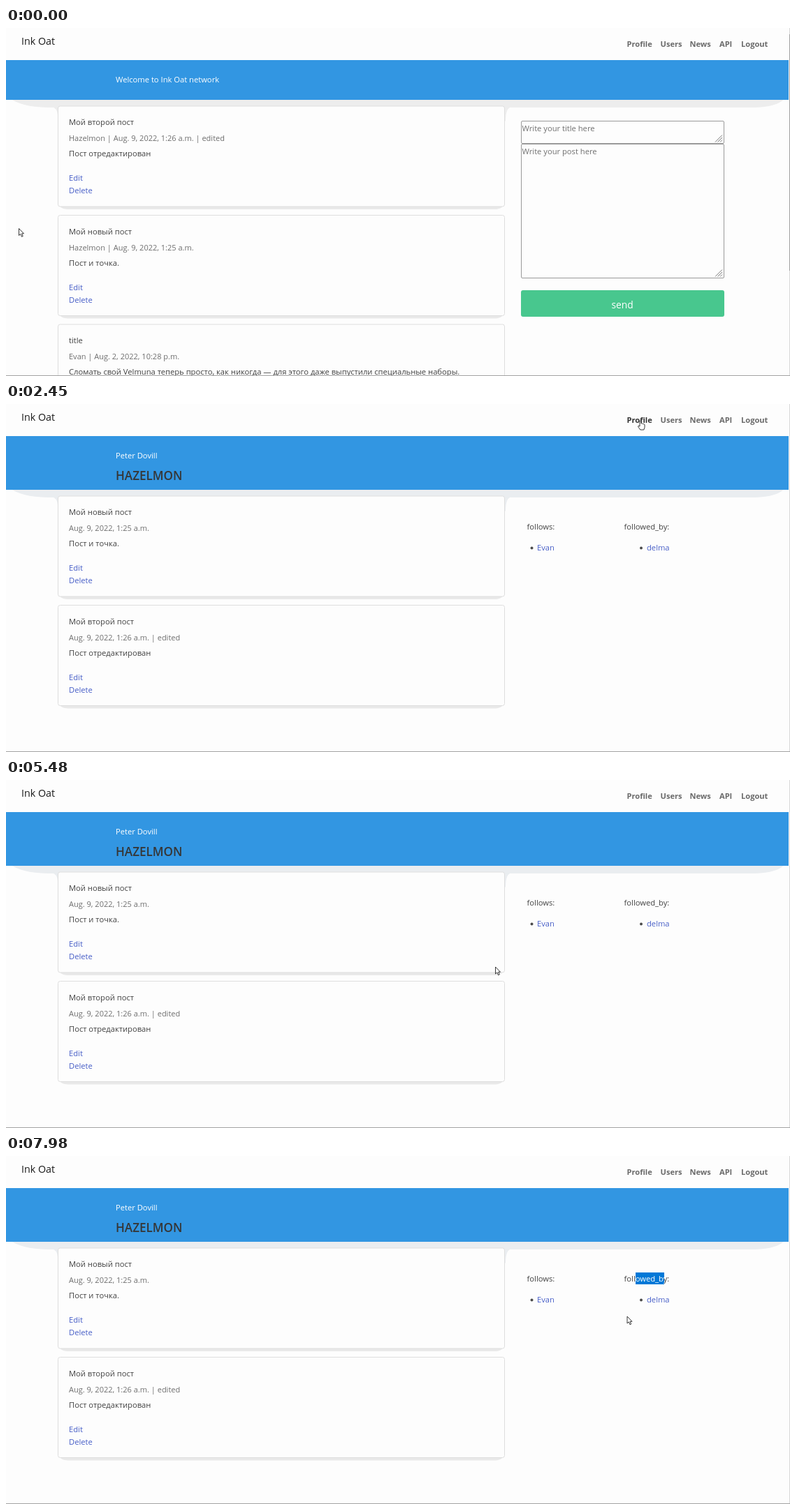
An HTML page that plays this animation: 1122 by 499 pixels, repeating every 8000 ms.

```html
<!DOCTYPE html>
<html lang="en">
<head>
<meta charset="utf-8">
<title>Social network</title>
<style>
  html, body { margin: 0; width: 100%; height: 100%; overflow: hidden; background: #fdfdfd; }
  svg { display: block; width: 1122px; height: 499px; }
  text { font: 11.2px "Open Sans", "Noto Sans", sans-serif; fill: #424242; white-space: pre; }
  .brand { font-size: 14.3px; fill: #1c1c1c; }
  .nav text { font-size: 11.1px; font-weight: 700; fill: #6a6a6a; }
  .nav .hover { fill: #333; }
  .meta { font-size: 11px; fill: #6e6e6e; }
  .hint { fill: #707070; }
  .link { fill: #485fc7; }
  .light { fill: #fff; }
  .name { font-size: 17.1px; font-weight: 600; fill: #363636; }
  .send { font-size: 13.8px; fill: #fff; text-anchor: middle; }
  .hero { fill: #3296e2; }
  .field { fill: #fdfdfd; stroke: #9a9a9a; }
  .grip { fill: none; stroke: #777; }
  .selected text { fill: #fff; }
  .pointer { fill: #fff; stroke: #222; stroke-width: .9; stroke-linejoin: round; }
  .beam { fill: none; stroke: #222; }
</style>
</head>
<body>
<svg viewBox="0 0 1122 499">
  <defs>
    <g id="frame">
      <path d="M76 143C80 148 85 148.500 90 148.500H699C705 148.500 709 147 712 143Z" fill="#e9e9e9"/>
      <rect x="74.500" y=".5" width="639" height="144" rx="3" fill="#fdfdfd" stroke="#dedede"/>
    </g>
    <g id="shade">
      <path d="M8 0C22 9 42 11.500 70 11.500H1072C1094 11 1107 6 1113 0Z"/>
      <path d="M74 11h-8q7 1 8 11zM714 11h9q-8 1-8 20h-1z"/>
    </g>
    <path id="grip" class="grip" d="M-11 -1L-1 -11M-7.500 -1L-1 -7.500M-4 -1L-1 -4"/>
    <g id="headings">
      <text x="745.500" y="180">follows:</text>
      <text x="884.500" y="180">followed_by:</text>
    </g>
    <clipPath id="range"><rect y="167" width="0" height="17"/></clipPath>
  </defs>

  <text class="brand" x="22" y="24">Ink Oat</text>
  <g class="nav">
    <text id="profileLink" x="888.500" y="26.500">Profile</text>
    <text x="936.500" y="26.500">Users</text>
    <text x="978.500" y="26.500">News</text>
    <text x="1021" y="26.500">API</text>
    <text x="1052" y="26.500">Logout</text>
  </g>
  <rect x="1121" width="1" height="499" fill="#d8d8d8"/>

  <g id="home">
    <use href="#shade" y="102.500" fill="#ededed"/>
    <rect class="hero" y="46" width="1120" height="57"/>
    <text class="light" x="157" y="78">Welcome to Ink Oat network</text>
    <rect x="1121" y="9" width="1" height="339" fill="#a0a0a0"/>
    <rect class="field" x="737.500" y="133.500" width="290" height="32" rx="1.500"/>
    <rect class="field" x="737.500" y="166.500" width="290" height="192" rx="1.500"/>
    <use href="#grip" x="1026" y="164.500"/>
    <use href="#grip" x="1026" y="357.500"/>
    <text class="hint" x="738.500" y="148">Write your title here</text>
    <text class="hint" x="738.500" y="181">Write your post here</text>
    <rect x="737" y="376" width="291" height="38" rx="3" fill="#48c78e"/>
    <text class="send" x="882" y="401.500">send</text>
    <g class="cards"></g>
  </g>

  <g id="profile">
    <use href="#shade" y="122.500" fill="#eaedf0"/>
    <rect class="hero" y="46" width="1120" height="77"/>
    <text class="light" x="157" y="78">Peter Dovill</text>
    <text class="name" x="157" y="108.500">HAZELMON</text>
    <use href="#headings"/>
    <circle cx="752.500" cy="206.500" r="2" fill="#4a4a4a"/>
    <circle cx="909" cy="206.500" r="2" fill="#4a4a4a"/>
    <text class="link" x="760" y="210">Evan</text>
    <text class="link" x="917" y="210">delma</text>
    <g class="selected" clip-path="url(#range)">
      <rect x="740" y="167" width="220" height="17" fill="#0078d7"/>
      <text x="745.500" y="180">follows:</text>
      <text x="884.500" y="180">followed_by:</text>
    </g>
    <g class="cards"></g>
  </g>

  <rect y="498" width="1122" height="1" fill="#a3a3a3"/>

  <g id="cursor">
    <path id="arrow" class="pointer" d="M.5 .5V10.500L2.800 8.400L4.500 12.300L6.200 11.500L4.600 7.800H7.500Z"/>
    <path id="hand" class="pointer" d="M3 8V1.500Q4 0 5 1.500V5Q6.500 4.200 7 5.500Q8.300 5 8.700 6Q10 5.700 10 7V10.500L8.800 14H3.800L.6 9.500Q.2 7.300 3 9Z"/>
    <path id="beam" class="beam" d="M-2.500 -5.500H-.7L0 -5L.7 -5.500H2.500M0 -5V5M-2.500 5.500H-.7L0 5L.7 5.500H2.500"/>
  </g>
</svg>

<script>
const LOOP = 8000;
const PAGE_SWITCH = 2450;
const TICK = 140;
const CARD_PITCH = 156.5;
const $ = id => document.getElementById(id);
const clamp = (v, lo, hi) => Math.min(hi, Math.max(lo, v));

const card = (y, { title, meta, body }) => `
  <g transform="translate(0 ${y})">
    <use href="#frame"/>
    <text x="90" y="27.500">${title}</text>
    <text class="meta" x="90" y="50.500">${meta}</text>
    <text x="90" y="72.500">${body}</text>
    <text class="link" x="90" y="107.500">Edit</text>
    <text class="link" x="90" y="125.500">Delete</text>
  </g>`;

const fillCards = (page, top, posts) => {
  page.querySelector('.cards').innerHTML =
    posts.map((post, i) => card(top + i * CARD_PITCH, post)).join('');
};

const first = { title: 'Мой новый пост', meta: 'Aug. 9, 2022, 1:25 a.m.', body: 'Пост и точка.' };
const second = { title: 'Мой второй пост', meta: 'Aug. 9, 2022, 1:26 a.m. | edited', body: 'Пост отредактирован' };
const article = {
  title: 'title',
  meta: 'Aug. 2, 2022, 10:28 p.m.',
  body: 'Сломать свой Velmuna теперь просто, как никогда — для этого даже выпустили специальные наборы.'
};
const by = (author, post) => ({ ...post, meta: `${author} | ${post.meta}` });

fillCards($('home'), 111.5, [by('Hazelmon', second), by('Hazelmon', first), by('Evan', article)]);
fillCards($('profile'), 131.5, [first, second]);

// A leg samples its path once per tick, with one key point for every two ticks.
const leg = (shape, start, ticks, path, { tick = TICK, drag } = {}) =>
  ({ shape, start, ticks, tick, drag, path: path.split(' ').map(p => p.split(',').map(Number)) });

// A drag selects text from its anchor, within the given bounds.
const legs = [
  leg('arrow', 0, 2, '18,287 18,291'),
  leg('arrow', 550, 7, '22,290 88,275 586,171 861,100 930,34'),
  leg('arrow', 1690, 0, '900,45'),
  leg('hand', 1840, 1, '903,27 905,19'),
  leg('arrow', 3920, 7, '864,20 792,31 640,72 389.5,125 154,231', { tick: 135 }),
  leg('arrow', 5030, 6, '264,192 520,285 880,250 826,195'),
  leg('beam', 6030, 0, '752,176'),
  leg('beam', 6163, 7, '749.5,175 771,175 800,177 895,177 949,177',
    { tick: 137, drag: { anchor: 746, min: 746, max: 786 } }),
  leg('beam', 7280, 2, '943,176 901,176', { drag: { anchor: 942, min: 885, max: 942 } }),
  leg('arrow', 7700, 2, '897,195 888.5,229.5')
];

function place({ start, ticks, tick, path }, t) {
  const u = clamp(Math.floor((t - start) / tick), 0, ticks) / 2;
  const i = Math.floor(u);
  const from = path[i];
  const to = path[i + 1] || from;
  return from.map((v, axis) => v + (to[axis] - v) * (u - i));
}

// The selection trails the pointer by one tick.
function selection(t) {
  const dragging = legs.findLast(l => l.drag && l.start <= t);
  if (!dragging) return [0, 0];
  const { anchor, min, max } = dragging.drag;
  const end = clamp(place(dragging, t - TICK)[0], min, max);
  return [Math.min(anchor, end), Math.abs(end - anchor)];
}

const show = (el, on) => el.setAttribute('visibility', on ? 'visible' : 'hidden');
const range = document.querySelector('#range rect');

function draw() {
  const t = performance.now() % LOOP;
  const current = legs.findLast(l => l.start <= t);
  const [left, width] = selection(t);

  show($('home'), t < PAGE_SWITCH);
  show($('profile'), t >= PAGE_SWITCH);
  for (const shape of ['arrow', 'hand', 'beam']) show($(shape), shape === current.shape);
  $('cursor').setAttribute('transform', `translate(${place(current, t)})`);
  $('profileLink').classList.toggle('hover', current.shape === 'hand');
  range.setAttribute('x', left);
  range.setAttribute('width', width);
  requestAnimationFrame(draw);
}
draw();
</script>
</body>
</html>
```
